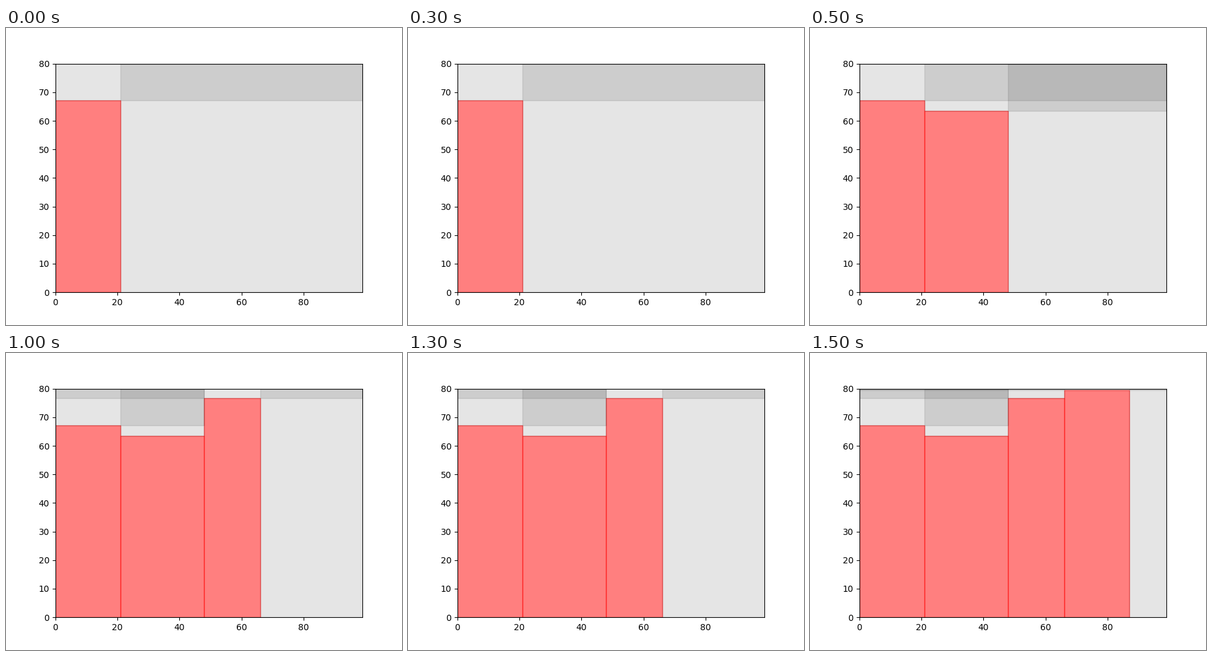
These frames come from a looping animation (640 by 480 pixels, 2 s). A matplotlib script:

```python
import matplotlib.pyplot as plt
from matplotlib.animation import FuncAnimation
from matplotlib.patches import Rectangle

BIN_W, BIN_H = 99, 80
ITEMS = [(21, 67.1), (27, 63.5), (18, 76.7), (21, 79.5)]


def split(free, used):
    """Return the maximal parts of a free rectangle left around a used one."""
    x0, y0, x1, y1 = free
    ux0, uy0, ux1, uy1 = used
    if ux0 >= x1 or ux1 <= x0 or uy0 >= y1 or uy1 <= y0:
        return [free]
    parts = [(x0, y0, ux0, y1), (ux1, y0, x1, y1),
             (x0, y0, x1, uy0), (x0, uy1, x1, y1)]
    return [p for p in parts if p[2] > p[0] and p[3] > p[1]]


def contains(a, b):
    return a[0] <= b[0] and a[1] <= b[1] and a[2] >= b[2] and a[3] >= b[3]


def prune(rects):
    rects = list(dict.fromkeys(rects))
    return [r for r in rects
            if not any(o != r and contains(o, r) for o in rects)]


def pack(items):
    """Place items side by side, recording placed and free areas per step."""
    placed, free, steps, x = [], [(0, 0, BIN_W, BIN_H)], [], 0
    for w, h in items:
        used = (x, 0, x + w, h)
        placed.append(used)
        free = prune([p for f in free for p in split(f, used)])
        steps.append((list(placed), free))
        x += w
    return steps


def add_boxes(rects, color, alpha):
    for x0, y0, x1, y1 in rects:
        ax.add_patch(Rectangle((x0, y0), x1 - x0, y1 - y0,
                               facecolor=color, edgecolor=color,
                               linewidth=1, alpha=alpha))


def draw(i):
    for patch in list(ax.patches):
        patch.remove()
    placed, free = steps[i]
    add_boxes(placed, "red", 0.5)
    add_boxes(free, "black", 0.1)
    return ax.patches


steps = pack(ITEMS)
fig, ax = plt.subplots(figsize=(6.4, 4.8), dpi=100)
ax.set_xlim(0, BIN_W)
ax.set_ylim(0, BIN_H)

anim = FuncAnimation(fig, draw, frames=len(steps), interval=500,
                     repeat=True, repeat_delay=0)
plt.show()
```
